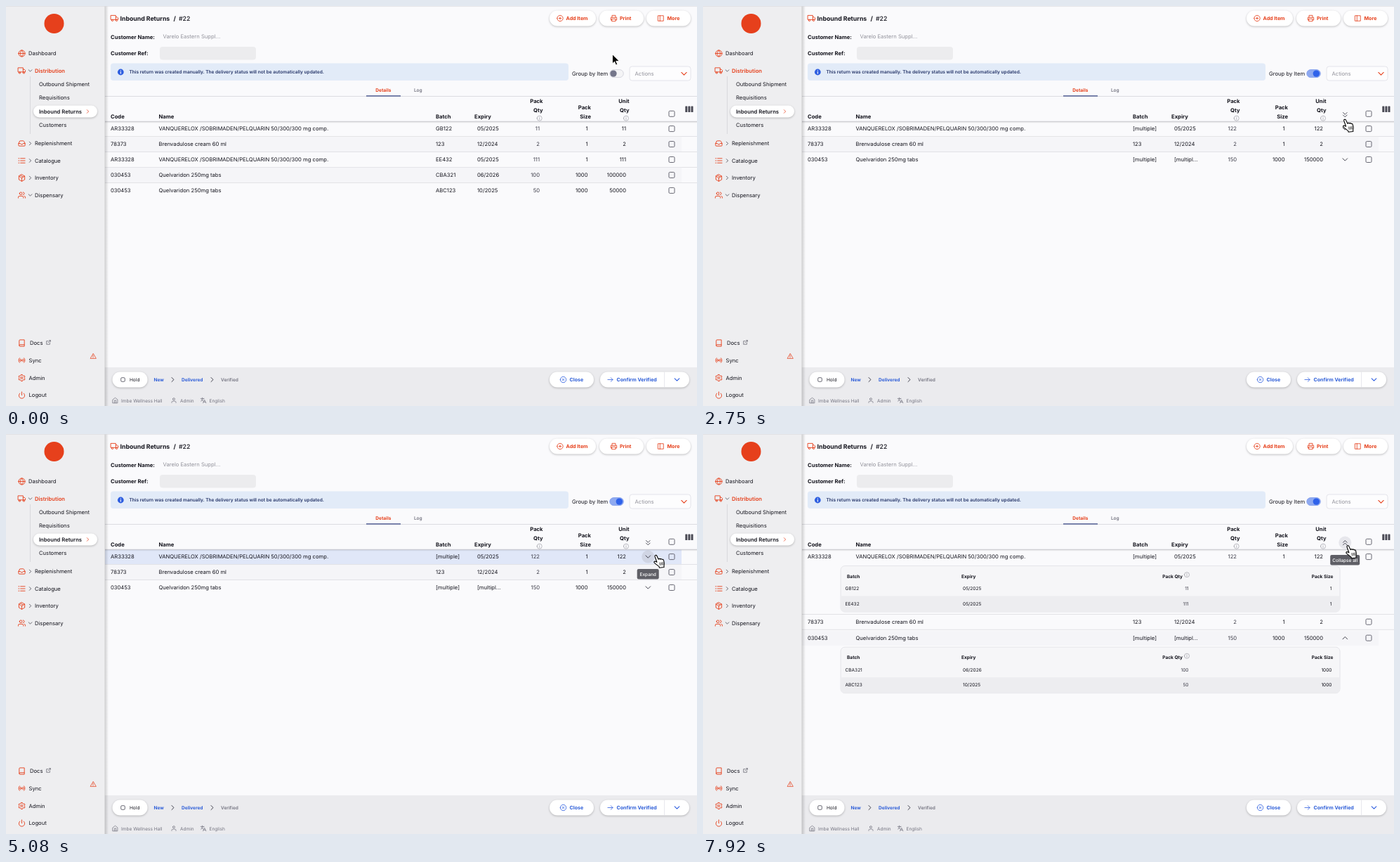
An HTML page for the animation above (8 s loop, 984x569 px).

```html
<!DOCTYPE html>
<html lang="en">
<head>
<meta charset="utf-8">
<title>Inbound Returns</title>
<style>
html, body { margin: 0; width: 100%; height: 100%; overflow: hidden; background: #fafafc; }
svg { display: block; width: 100vw; height: 100vh; }
text { font: 400 7.65px Inter, sans-serif; fill: #14141d; text-rendering: geometricPrecision; white-space: pre; }
.small { font-size: 6.55px; }
.button { font-size: 7.1px; }
.title { font-size: 8.75px; }
.medium { font-weight: 500; }
.semi { font-weight: 600; }
.bold { font-weight: 700; }
.end { text-anchor: end; }
.mid { text-anchor: middle; }
.orange { fill: #e6401c; }
.blue { fill: #2f5fd8; }
.navy { fill: #243468; }
.gray { fill: #747480; }
.pale { fill: #92929b; }
.soft { fill: #3c3c48; }
.white { fill: #fff; }
.pill { fill: #fff; filter: drop-shadow(0 1px 1.6px #0000003d); }
</style>
</head>
<body>
<svg id="stage" viewBox="0 0 984 569" preserveAspectRatio="none"></svg>
<script>
const ORANGE = '#e6401c', BLUE = '#2f5fe0', DARK = '#3c3c48', GRAY = '#747480';

// 24-unit line icons
const circle = (x, y, r) => `M${x - r} ${y}a${r} ${r} 0 1 0 ${2 * r} 0a${r} ${r} 0 1 0 ${-2 * r} 0z`;
const ICONS = {
  globe: circle(12, 12, 10) + 'M2 12h20M12 2c6 6 6 14 0 20c-6-6-6-14 0-20',
  truck: 'M1 3h15v13H1zM16 8h4l3 3v5h-7' + circle(5.5, 18.5, 2.5) + circle(18.5, 18.5, 2.5),
  inbox: 'M22 12h-6l-2 3h-4l-2-3H2M5.5 5L2 12v6q0 2 2 2h16q2 0 2-2v-6l-3.5-7q-.5-1-2-1h-9q-1.5 0-2 1z',
  list: 'M8 5h14M8 12h14M8 19h14M2 5h2M2 12h2M2 19h2',
  box: 'M12 1.5l9 5v11l-9 5-9-5v-11zM3 6.5l9 5.5 9-5.5M12 12v10.5M7.5 4l9 5.2',
  users: circle(9, 7, 4) + 'M1 21v-2q0-4 4-4h8q4 0 4 4v2M16 3q4 1 4 4t-4 4M23 21v-2q0-3-3-4',
  book: 'M4 19.5q0-2.5 2.5-2.5H20V2H6.5Q4 2 4 4.5v15Q4 22 6.5 22H20v-5',
  radio: circle(12, 12, 2) + 'M16.2 7.8a6 6 0 0 1 0 8.5M7.8 16.2a6 6 0 0 1 0-8.5M19 5a10 10 0 0 1 0 14M5 19a10 10 0 0 1 0-14',
  gear: circle(12, 12, 3) + 'M10 2h4l.7 3 2.3 1.3 3-1 2 3.5-2.3 2v2.4l2.3 2-2 3.5-3-1-2.3 1.3-.7 3h-4l-.7-3L7 17.7l-3 1-2-3.5 2.3-2v-2.4l-2.3-2 2-3.5 3 1L9.3 5z',
  power: 'M18 6.5a9 9 0 1 1-12 0M12 2v10',
  link: 'M18 13v8H3V6h8M15 3h6v6M10 14L21 3',
  warn: 'M12 3L1.5 21h21zM12 9v5M12 17v1',
  plus: circle(12, 12, 10) + 'M12 8v8M8 12h8',
  cross: circle(12, 12, 10) + 'M15 9l-6 6M9 9l6 6',
  info: circle(12, 12, 10) + 'M12 11v6M12 7v1',
  print: 'M6 9V2h12v7M6 18H2V9h20v9h-4M6 14h12v8H6z',
  panel: 'M3 3h18v18H3zM9 3v18',
  arrow: 'M3 12h18M14 5l7 7-7 7',
  home: 'M3 9l9-7 9 7v13H3zM9 22V12h6v10',
  user: circle(12, 7, 4) + 'M4 21v-2q0-4 4-4h8q4 0 4 4v2',
  language: 'M2 5h13M8 2v3M12 5q-2 7-9 10M5 8q3 5 7 7M11 22l5.5-12L22 22M13 18h7',
  right: 'M8 4l8 8-8 8',
  down: 'M4 8l8 8 8-8',
  up: 'M4 16l8-8 8 8',
  doubleDown: 'M5 4l7 7 7-7M5 13l7 7 7-7',
  doubleUp: 'M5 11l7-7 7 7M5 20l7-7 7 7',
};

const icon = (name, x, y, color, size = 11, weight = 2) =>
  `<path d="${ICONS[name]}" transform="translate(${x - size / 2} ${y - size / 2}) scale(${size / 24})"
    fill="none" stroke="${color}" stroke-width="${weight}" stroke-linejoin="round" stroke-linecap="round"/>`;

// y is the middle of the capitals
function text(x, y, string, style = '') {
  const size = /title/.test(style) ? 8.75 : /small/.test(style) ? 6.55 : /button/.test(style) ? 7.1 : 7.65;
  return `<text x="${x}" y="${y + size * .364}" class="${style}">${string}</text>`;
}
const rect = (x, y, w, h, fill, r = 0, extra = '') =>
  `<rect x="${x}" y="${y}" width="${w}" height="${h}" rx="${r}" fill="${fill}" ${extra}/>`;
const pill = (x, y, w, h) => rect(x, y, w, h, '#fff', h / 2, 'class="pill"');
const hline = (x1, x2, y, color = '#dcdce1') => rect(x1, y - .4, x2 - x1, .8, color);
const checkbox = (x, y, size = 8) =>
  rect(x - size / 2, y - size / 2, size, size, 'none', 1.4, 'stroke="#60606c" stroke-width=".95"');

function sidebar() {
  const groups = [['truck', 92, 'Distribution'], ['inbox', 195.5, 'Replenishment'], ['list', 220, 'Catalogue'],
    ['box', 244.5, 'Inventory'], ['users', 269, 'Dispensary']];
  const bottom = [['book', 479.5, 'Docs', 34], ['radio', 504, 'Sync', 32.5], ['gear', 529, 'Admin', 32.5], ['power', 553.5, 'Logout', 32.5]];
  return rect(140, 0, 6, 569, 'url(#edge)') + rect(0, 0, 140.5, 569, '#eeeef0')
    + `<circle cx="68.5" cy="25" r="14" fill="${ORANGE}"/>`
    + icon('globe', 22.5, 67.5, ORANGE) + text(32, 67.3, 'Dashboard')
    + groups.map(([name, y, label], i) => icon(name, 22.5, y, ORANGE)
      + icon(i % 4 ? 'right' : 'down', 34.5, y, DARK, 7, 2.6)
      + text(41, y, label, i ? '' : 'semi orange')).join('')
    + rect(34.2, 100, .7, 82, '#cfcfd5')
    + pill(39, 141.5, 91, 17)
    + text(47, 111.5, 'Outbound Shipment') + text(47, 130.7, 'Requisitions')
    + text(47, 150, 'Inbound Returns', 'semi') + icon('right', 116.5, 150, ORANGE, 7, 2.6)
    + text(47, 169, 'Customers')
    + bottom.map(([name, y, label, x]) => icon(name, 22.5, y, ORANGE) + text(x, y, label)).join('')
    + icon('link', 60.5, 478.5, DARK, 7.5, 1.8) + icon('warn', 124, 498, ORANGE, 9);
}

function toolbar() {
  return icon('truck', 154.5, 17.5, ORANGE) + text(162.5, 17.5, 'Inbound Returns', 'title bold')
    + text(238.5, 17.5, '/', 'title bold') + text(246, 17.5, '#22', 'title medium')
    + [[774, 66, 'plus', 789, 'Add Item', 797.5], [845, 63, 'print', 865.5, 'Print', 874], [912, 63, 'panel', 932.5, 'More', 941.5]]
      .map(([x, w, name, ix, label, tx]) => pill(x, 6.5, w, 22) + icon(name, ix, 17.5, ORANGE, 10)
        + text(tx, 17.5, label, 'button bold orange')).join('')
    + text(149, 44.5, 'Customer Name:', 'bold') + text(223.5, 43.7, 'Varelo Eastern Suppl...', 'pale')
    + text(149, 67.7, 'Customer Ref:', 'bold') + rect(219, 58, 137, 18.5, '#ececee', 4)
    + rect(149, 81.5, 652, 24.5, '#e2ebf8', 4)
    + `<circle cx="163.3" cy="94" r="4.4" fill="${BLUE}"/>` + rect(162.8, 93.3, 1.1, 3.2, '#fff') + rect(162.8, 91.3, 1.1, 1.1, '#fff')
    + text(175.5, 93.7, 'This return was created manually. The delivery status will not be automatically updated.', 'small semi navy')
    + text(806, 96.2, 'Group by Item')
    + rect(888, 86, 87, 20, '#fdfdfe', 3.5, 'stroke="#dedee5" stroke-width=".8"')
    + text(895.5, 96.5, 'Actions', 'pale') + icon('down', 965.5, 96.3, ORANGE, 11, 2.4)
    + text(537.3, 119.7, 'Details', 'small bold mid orange') + text(586.8, 119.7, 'Log', 'small semi mid gray')
    + hline(141, 984, 128.5, '#d5d5db') + rect(513, 127.3, 49, 1.3, '#3d4b87');
}

function footer() {
  return rect(140.5, 514, 843.5, 55, '#ebebee')
    + pill(151.5, 520.5, 50, 22) + checkbox(166.5, 531.5, 5.6) + text(176, 531.5, 'Hold', 'small')
    + text(210.5, 531.5, 'New', 'small bold blue') + icon('right', 237.5, 531.5, DARK, 9, 2.6)
    + text(250, 531.5, 'Delivered', 'small bold blue') + icon('right', 293.5, 531.5, DARK, 9, 2.6)
    + text(306, 531.5, 'Verified', 'small semi gray')
    + pill(774, 520.5, 63, 22) + icon('cross', 793.5, 531.5, BLUE, 10) + text(802.5, 531.5, 'Close', 'button bold blue')
    + pill(846, 520.5, 127, 22) + icon('arrow', 860.5, 531.5, BLUE, 9.5) + text(869.5, 531.5, 'Confirm Verified', 'button bold blue')
    + rect(937.2, 520.5, .7, 22, '#dedee5') + icon('down', 955.5, 531.5, BLUE, 10, 2.6)
    + icon('home', 155.5, 561, GRAY, 9) + text(164, 561.7, 'Imbe Wellness Hall', 'small gray')
    + icon('user', 239, 561, GRAY, 9) + text(248, 561.7, 'Admin', 'small gray')
    + icon('language', 281, 561, GRAY, 9) + text(289.5, 561.7, 'English', 'small gray');
}

function tableHead() {
  return rect(141, 129, 843, 35.5, '#fafafc') + rect(141, 164, 843, 3, 'url(#headShade)') + hline(141, 984, 164.2, '#c6c6cd')
    + [[149, 'Code'], [217.5, 'Name'], [612, 'Batch'], [667, 'Expiry']].map(([x, s]) => text(x, 157.5, s, 'bold')).join('')
    + text(764.5, 135.7, 'Pack', 'bold end') + text(764.5, 148.7, 'Qty', 'bold end') + icon('info', 759.7, 159.7, GRAY, 8.5, 1.3)
    + text(833, 144.7, 'Pack', 'bold end') + text(833, 157.5, 'Size', 'bold end')
    + text(887.5, 135.7, 'Unit', 'bold end') + text(887.5, 148.7, 'Qty', 'bold end') + icon('info', 883, 159.7, GRAY, 8.5, 1.3)
    + checkbox(948, 153.3)
    + [967.3, 971.4, 975.5].map(x => rect(x, 142.5, 3, 8.5, '#4a4a55', .5)).join('');
}

const VANQ = ['AR33328', 'VANQUERELOX /SOBRIMADEN/PELQUARIN 50/300/300 mg comp.'];
const BREN = ['78373', 'Brenvadulose cream 60 ml', '123', '12/2024', 2, 1];
const QUEL = ['030453', 'Quelvaridon 250mg tabs'];
const LINES = [
  [...VANQ, 'GB122', '05/2025', 11, 1], BREN, [...VANQ, 'EE432', '05/2025', 111, 1],
  [...QUEL, 'CBA321', '06/2026', 100, 1000], [...QUEL, 'ABC123', '10/2025', 50, 1000],
];
const GROUPED = [
  [...VANQ, '[multiple]', '05/2025', 122, 1], BREN, [...QUEL, '[multiple]', '[multipl...', 150, 1000],
];

function subTable(y, code) {
  const lines = LINES.filter(line => line[0] === code);
  return rect(196, y + 13, 711, 65.5, '#f6f6f8', 6, 'stroke="#e0e0e5" stroke-width=".8"')
    + `<path d="M196 ${y + 56}h711v16.5q0 6-6 6h-699q-6 0-6-6z" fill="#ededf0"/>`
    + text(205, y + 27.6, 'Batch', 'small bold') + text(368, y + 27.6, 'Expiry', 'small bold')
    + text(683, y + 27.6, 'Pack Qty', 'small bold end') + icon('info', 689, y + 25.6, GRAY, 8.5, 1.3)
    + text(897.5, y + 27.6, 'Pack Size', 'small bold end')
    + lines.map(([, , batch, expiry, qty, size], i) => {
      const ly = y + 45 + i * 21.8;
      return text(202.5, ly, batch, 'small') + text(370, ly, expiry, 'small')
        + text(691.5, ly, qty, 'small end soft') + text(895.5, ly, size, 'small end');
    }).join('');
}

function tableBody({ grouped, openFirst, openAll, hoverRow, hoverHead }) {
  const rows = grouped ? GROUPED : LINES;
  let y = 174.6, child = 0, out = '';
  rows.forEach((row, i) => {
    const [code, name, batch, expiry, qty, size] = row;
    const expandable = batch === '[multiple]';
    const open = expandable && (openAll || (openFirst && i === 0));
    if (open && i) y += 1;
    const fill = hoverRow && i === 0 ? '#e0e7f8' : child % 2 ? '#f5f5f8' : 'none';
    out += rect(141, y - 10.6, 821, 21.5, fill)
      + text(149, y, code) + text(217.5, y, name) + text(612, y, batch) + text(671, y, expiry)
      + text(760, y, qty, 'end soft') + text(828.5, y, size, 'end') + text(883, y, qty * size, 'end')
      + checkbox(948, y);
    if (expandable) {
      if (hoverRow && i === 0) out += `<circle cx="914.3" cy="${y}" r="9" fill="#d0d5e4"/>`;
      out += icon(open ? 'up' : 'down', 914.3, y, DARK, 10, 2.3);
    }
    if (open) out += subTable(y, code);
    if (i < rows.length - 1) out += hline(141, 984, y + (open ? 82 : 11));
    y += open ? 92.6 : 21.95;
    child += open ? 2 : 1;
  });
  out += tableHead();
  if (grouped) {
    if (hoverHead) out += '<circle cx="914.3" cy="154.5" r="9" fill="#e7e7ec"/>';
    out += icon(openFirst || openAll ? 'doubleUp' : 'doubleDown', 914.3, 154.7, DARK, 9.5, 2.3);
  }
  return out;
}

function tooltip({ tip, tipY }) {
  if (!tip) return '';
  const w = { Expand: 31, Collapse: 34, 'Expand all': 38, 'Collapse all': 42 }[tip];
  return rect(914.2 - w / 2, tipY - 7.3, w, 14.6, '#5f5f66', 2.2) + text(914.2, tipY, tip, 'small medium mid white');
}

const between = (t, a, b) => t >= a && t < b;
const ease = u => u * u * (3 - 2 * u);
const progress = (t, a, b) => ease(Math.min(1, Math.max(0, (t - a) / (b - a))));

const GROUP_AT = 1500, OPEN_AT = 3400, CLOSE_AT = 4750, ALL_AT = 7350;

function stateAt(t) {
  const openFirst = between(t, OPEN_AT, CLOSE_AT), openAll = t >= ALL_AT;
  const tip = t >= 6650 ? (openAll ? 'Collapse all' : 'Expand all')
    : between(t, 3150, 5200) ? (openFirst ? 'Collapse' : 'Expand') : '';
  return {
    grouped: t >= GROUP_AT, openFirst, openAll, tip, tipY: t >= 6650 ? 179.2 : 199.2,
    hoverRow: between(t, 2950, 5200), hoverHead: t >= 6400,
  };
}

const PATH = [[300, 863.5, 69], [900, 867.5, 97], [1750, 867.5, 97], [2650, 914, 162], [2750, 914, 162],
  [3050, 922, 178], [4850, 922, 178], [5450, 932, 163], [6150, 932, 163], [6500, 918.3, 159.5]];

function cursorAt(t) {
  const next = PATH.findIndex(point => point[0] > t);
  if (next === 0) return PATH[0].slice(1);
  if (next < 0) return PATH[PATH.length - 1].slice(1);
  const [t0, x0, y0] = PATH[next - 1], [t1, x1, y1] = PATH[next];
  const u = progress(t, t0, t1);
  return [x0 + (x1 - x0) * u, y0 + (y1 - y0) * u];
}
const isHand = t => between(t, 700, 1950) || between(t, 2550, 5250) || t >= 6350;

const stage = document.getElementById('stage');
stage.innerHTML = `
  <defs>
    <linearGradient id="edge"><stop stop-color="#000" stop-opacity=".2"/><stop offset="1" stop-color="#000" stop-opacity="0"/></linearGradient>
    <linearGradient id="headShade" x2="0" y2="1"><stop stop-color="#000" stop-opacity=".13"/><stop offset="1" stop-color="#000" stop-opacity="0"/></linearGradient>
  </defs>
  ${rect(0, 0, 984, 569, '#fafafc')}
  <g id="table"></g>
  ${toolbar()}
  ${rect(859.8, 90.6, 19.5, 11, '#f4f4f6', 5.5, 'id="track" stroke-width=".8"')}
  <circle id="knob" cy="96.1" r="4.7"/>
  ${footer()}${sidebar()}${hline(0, 984, .3, '#dcdce0')}
  <g id="tooltip"></g>
  <g id="cursor" stroke-linejoin="round" stroke-linecap="round">
    <path id="pointer" d="M0 0v13l3-2.8 2 4.7 2.2-1-2-4.5h4.3z" fill="#000" stroke="#fff" stroke-width=".9"/>
    <g id="hand" fill="#fff" stroke="#000" stroke-width="1.1">
      <path d="M-1.3 1.2C-1.8-.8 .8-1.4 1.6 .4L3.8 5.2C4.6 4 6.2 4.2 6.5 5.2 7.3 4.2 8.8 4.6 9 5.6 10 5 11 5.6 11.2 6.6L12 10C12.4 12 11.8 13 11.6 15L11.8 16.5 5 17.2 4.8 15.6C3 14.4 1 12.6-1.6 10.6-3.4 9.4-2.2 7.8-.6 8.2L1.6 9.2z"/>
      <path d="M5.8 10l.4 3.5M8 9.8l.4 3.5M10 9.5l.3 3.5" stroke-width=".8"/>
    </g>
  </g>`;
const [table, track, knob, tips, cursor, pointer, hand] =
  ['table', 'track', 'knob', 'tooltip', 'cursor', 'pointer', 'hand'].map(id => document.getElementById(id));

let shown = '';
function draw(t) {
  const state = stateAt(t), key = JSON.stringify(state);
  if (key !== shown) {
    shown = key;
    table.innerHTML = tableBody(state);
    tips.innerHTML = tooltip(state);
    track.setAttribute('fill', state.grouped ? '#8ea9f0' : '#f4f4f6');
    track.setAttribute('stroke', state.grouped ? '#7c9aec' : '#cfcfd8');
    knob.setAttribute('fill', state.grouped ? '#2f62ea' : '#74768a');
  }
  knob.setAttribute('cx', 865 + 8.3 * progress(t, GROUP_AT, GROUP_AT + 150));
  cursor.setAttribute('transform', `translate(${cursorAt(t)})`);
  pointer.style.display = isHand(t) ? 'none' : '';
  hand.style.display = isHand(t) ? '' : 'none';
}

function tick() {
  draw(performance.now() % 8000);
  requestAnimationFrame(tick);
}
tick();
</script>
</body>
</html>
```
